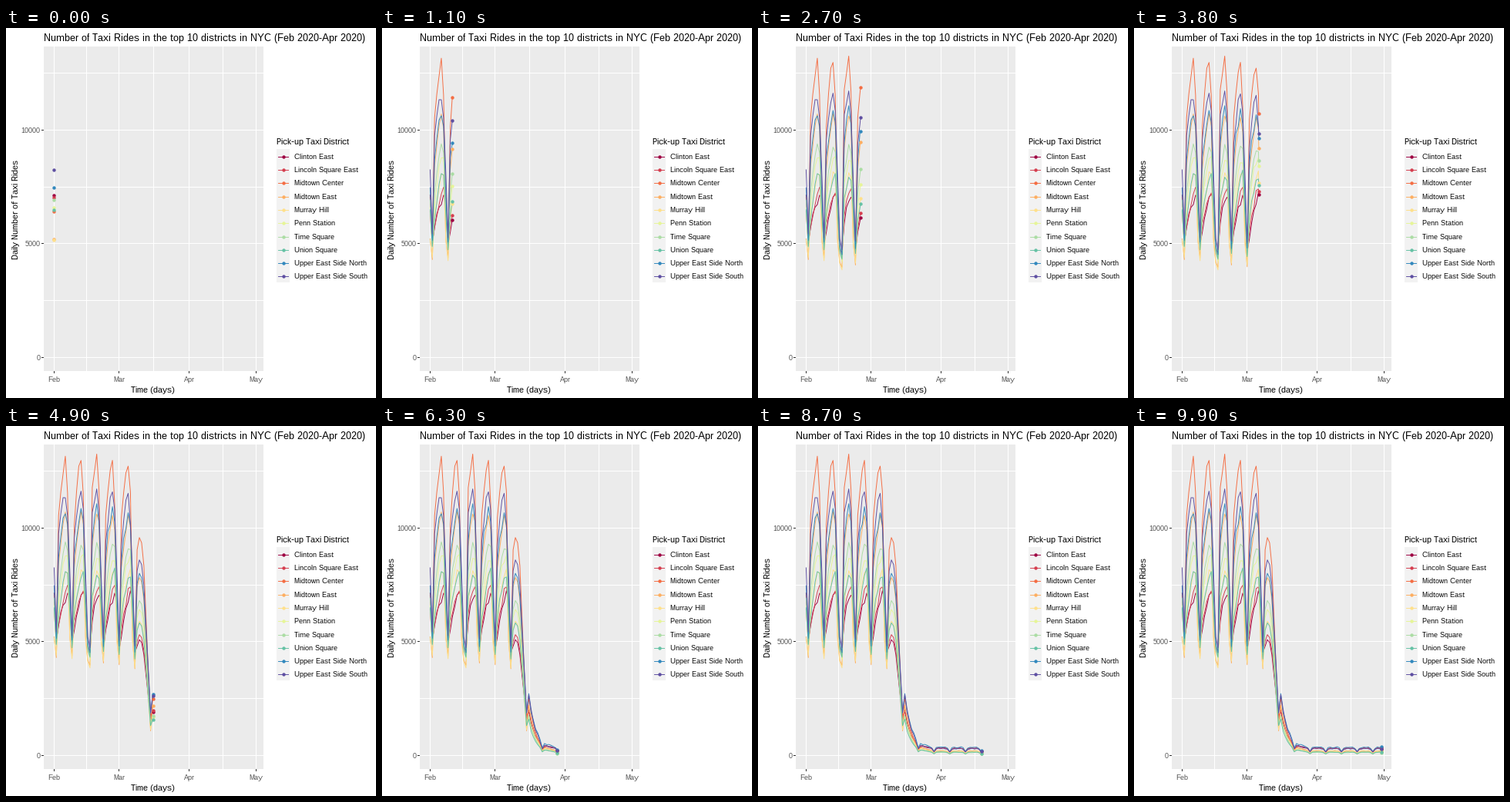
Animation of 480 by 480 pixels, one loop 10 s. Source, as a matplotlib script:

```python
import numpy as np
import matplotlib.pyplot as plt
from matplotlib.animation import FuncAnimation
from matplotlib.patches import Rectangle

# Whole-pixel glyph hinting without kerning keeps the small text crisp
plt.rcParams.update({
    "font.family": "Liberation Sans",
    "text.hinting": "native",
    "text.hinting_factor": 1,
    "text.kerning_factor": 6,
    "path.simplify": False,
})

SIZE, DPI = 480, 72
FRAMES, DAYS = 100, 90
HOLIDAY, DROP, REBOUND = 16, 37, 44  # days counted from Saturday 1 February

# name, colour, rides on a Saturday, on a Thursday, and on a day in April
DISTRICTS = [
    ("Clinton East", "#9E0142", 7150, 6900, 320),
    ("Lincoln Square East", "#D53E4F", 7050, 7200, 330),
    ("Midtown Center", "#F46D43", 6420, 12980, 190),
    ("Midtown East", "#FDAE61", 5220, 10600, 210),
    ("Murray Hill", "#FEE08B", 5180, 8000, 200),
    ("Penn Station", "#E6F598", 6600, 8700, 160),
    ("Time Square", "#ABDDA4", 6930, 9230, 140),
    ("Union Square", "#66C2A5", 6500, 7900, 155),
    ("Upper East Side North", "#3288BD", 7470, 10850, 370),
    ("Upper East Side South", "#5E4FA2", 8260, 11650, 310),
]


def normal_day(day, sat, thu):
    """Weekly rhythm: low on Sunday, steep climb to Thursday, softer Friday."""
    week, weekday = divmod(day, 7)
    sun = 2600 + .35 * sat
    if day == HOLIDAY:
        return .88 * sun
    if weekday == 0:
        return sat * (1 - .01 * week)
    if weekday == 6:
        return thu * (1.2 - thu / 42000)
    climb = ((weekday - 1) / 4) ** (2200 / (thu - 4000))
    return sun * (1 - .025 * week) * (1 - climb) + thu * climb


def district_rides(sat, thu, april, rng):
    rides = np.array([normal_day(d, sat, thu) for d in range(DAYS)])
    rides[1:DROP] *= rng.normal(1, .015, DROP - 1)

    # Last busy week, then a straight fall to Sunday and a short rebound
    rebound = .163 * thu + 3 * april - 150
    days = np.arange(DROP, DROP + 4)
    dome = .74 * thu * (1 - .04 * (days - 38.2) ** 2)
    sunday = rebound * min(sat / thu, .85)
    keys = [*days, REBOUND - 1, REBOUND]
    rides[DROP:REBOUND + 1] = np.interp(
        np.arange(DROP, REBOUND + 1), keys, [*dome, sunday, rebound])

    # Decay to the April level with a dip every Sunday
    days = np.arange(REBOUND + 1, DAYS)
    level = april + (rebound - april) * np.exp(-.35 * (days - REBOUND))
    dip = 1 - .5 * np.exp(-((days % 7 - 1) / .8) ** 2)
    rides[REBOUND + 1:] = level * dip * rng.uniform(.92, 1.06, len(days))
    return rides


def day_x(day):
    return 62.4 + 2.911 * np.asarray(day)


def ride_y(count):
    return 427.6 - .0295 * np.asarray(count)


fig = plt.figure(figsize=(SIZE / DPI, SIZE / DPI), dpi=DPI, facecolor="white")
ax = fig.add_axes([0, 0, 1, 1])
ax.set(xlim=(0, SIZE), ylim=(SIZE, 0))
ax.axis("off")


def box(x, y, w, h, color):
    ax.add_patch(Rectangle((x, y), w, h, fc=color, ec="none", lw=0, antialiased=False))


def label(x, y, text, size, color="black", **kw):
    ax.text(x, y, text, fontsize=size, color=color, va="baseline", **kw)


def stroke(color):
    return ax.plot([], [], color=color, lw=.95, solid_joinstyle="round")[0]


def dot(color):
    return ax.plot([], [], "o", color=color, ms=4.4, mew=0)[0]


# Panel and grid
box(49, 24, 285, 421, "#EBEBEB")
for x in (62, 104, 146, 191, 237, 281, 324):
    box(x, 24, 1, 421, "white")
for y in (58, 132, 206, 279, 353, 427):
    box(49, y, 285, 1, "white")

# Axes
for x, month in zip((62, 146, 237, 324), ("Feb", "Mar", "Apr", "May")):
    box(x, 445, 1, 3, "#333333")
    label(x + .5, 459, month, 9, "#4D4D4D", ha="center")
for y, count in zip((427, 279, 132), (0, 5000, 10000)):
    box(46, y, 3, 1, "#333333")
    label(44.5, y + 4, str(count), 9, "#4D4D4D", ha="right")

label(49, 17, "Number of Taxi Rides in the top 10 districts in NYC (Feb 2020-Apr 2020)", 13)
label(190.5, 473, "Time (days)", 11, ha="center")
label(16, 236, "Daily Number of Taxi Rides", 11, ha="center",
      rotation=90, rotation_mode="anchor")

# Legend and data
label(351, 151, "Pick-up Taxi District", 11)
box(351, 157, 17, 173, "#F2F2F2")
rng = np.random.default_rng(4)
colors, rides = [], []
for i, (name, color, *levels) in enumerate(DISTRICTS):
    y = int(166.2 + 17.3 * i) + .5
    stroke(color).set_data([353, 366], [y, y])
    dot(color).set_data([359.5], [y])
    label(374, y + 3.5, name, 9)
    colors.append(color)
    rides.append(district_rides(*levels, rng))

lines = [stroke(c) for c in colors]
heads = [dot(c) for c in colors]
all_days = np.arange(DAYS)


def update(frame):
    now = (DAYS - 1) * frame / (FRAMES - 1)
    t = np.append(all_days[all_days < now], now)
    for line, head, row in zip(lines, heads, rides):
        x, y = day_x(t), ride_y(np.interp(t, all_days, row))
        line.set_data(x, y)
        head.set_data(x[-1:], y[-1:])
    return lines + heads


anim = FuncAnimation(fig, update, frames=FRAMES, interval=100, repeat=True, repeat_delay=0)
plt.show()
```
